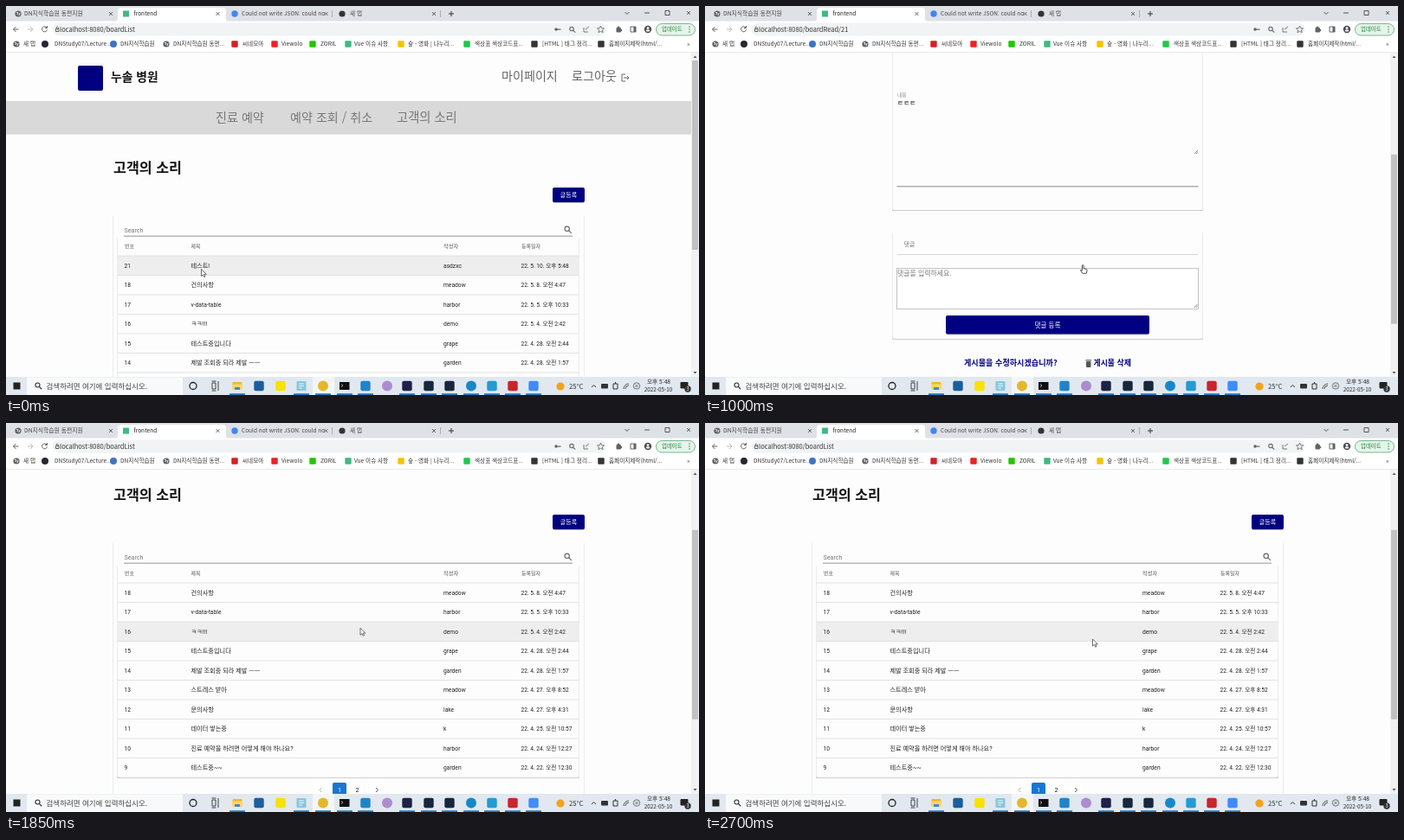
These frames come from a looping animation (800 by 450 pixels, 2.73 s). An HTML page:

```html
<!DOCTYPE html>
<html lang="ko">
<head>
<meta charset="utf-8">
<style>
html, body { margin: 0; width: 100%; height: 100%; overflow: hidden; background: #fff; }
svg { display: block; width: 800px; height: 450px; }
text { font-family: "Noto Sans CJK KR", "Noto Sans CJK", sans-serif; white-space: pre; }
.r { font-family: Roboto, "Noto Sans CJK KR", "Noto Sans CJK", sans-serif; }
.b { font-weight: 700; }
.m { text-anchor: middle; }
</style>
</head>
<body>
<svg id="stage" viewBox="0 0 800 450" xmlns="http://www.w3.org/2000/svg"></svg>
<script>
const NAVY = '#000080', INK = '#222', ICON = '#5f6368';

// y is the visual middle of the line
const text = (x, y, s, size, fill = INK, cls = '') =>
  `<text x="${x}" y="${y + size * 0.36}" font-size="${size}" fill="${fill}" class="${cls}">${s}</text>`;
const box = (x, y, w, h, fill, r = 0, extra = '') =>
  `<rect x="${x}" y="${y}" width="${w}" height="${h}" rx="${r}" fill="${fill}" ${extra}/>`;
const dot = (x, y, r, fill) => `<circle cx="${x}" cy="${y}" r="${r}" fill="${fill}"/>`;
const ring = (x, y, r, stroke, w) => `<circle cx="${x}" cy="${y}" r="${r}" fill="none" stroke="${stroke}" stroke-width="${w}"/>`;
const path = (d, stroke = ICON, w = 1, fill = 'none') =>
  `<path d="${d}" stroke="${stroke}" stroke-width="${w}" fill="${fill}"/>`;
const group = (id, body, extra = '') => `<g id="${id}" ${extra}>${body}</g>`;
const card = (x, y, w, h) =>
  box(x, y + 2, w, h - 1, '#e4e4e4', 2) + box(x, y + h - 1, w, 2, '#cfcfcf', 1) + box(x + 0.7, y, w - 1.4, h, '#fdfdfd', 2);
const lens = (x, y, r, color) => ring(x, y, r, color, 1.1) + path(`M${x + r * .7} ${y + r * .7}l${r * 1.2} ${r * 1.2}`, color, 1.1);
const globe = (x, y) => dot(x, y, 3.6, ICON) + path(`M${x - 2} ${y - 2}l2 1 -1 2M${x + 2} ${y - 1}l-1 3`, '#fff', .9);

const posts = [
  ['21', '테스트!', 'asdzxc', '22. 5. 10. 오후 5:48'],
  ['18', '건의사항', 'meadow', '22. 5. 8. 오전 4:47'],
  ['17', 'v-data-table', 'harbor', '22. 5. 5. 오후 10:33'],
  ['16', 'ㅋㅋ!!!', 'demo', '22. 5. 4. 오전 2:42'],
  ['15', '테스트중입니다', 'grape', '22. 4. 28. 오전 2:44'],
  ['14', '제발 조회중 되라 제발 ㅡㅡ', 'garden', '22. 4. 28. 오전 1:57'],
  ['13', '스트레스 받아', 'meadow', '22. 4. 27. 오후 8:52'],
  ['12', '문의사항', 'lake', '22. 4. 27. 오후 4:31'],
  ['11', '데이터 쌓는중', 'k', '22. 4. 25. 오전 10:57'],
  ['10', '진료 예약을 하려면 어떻게 해야 하나요?', 'harbor', '22. 4. 24. 오전 12:27'],
  ['9', '테스트중~~', 'garden', '22. 4. 22. 오전 12:30']
];
const ROW_TOP = 289, ROW = 22.5;

const siteHeader = () =>
  box(83, 69, 29, 29, NAVY, 2) + text(121, 82, '누솔 병원', 13.8, '#111', 'b') +
  text(572, 81, '마이페이지', 14.1, '#666') + text(653, 81, '로그아웃', 14.1, '#666') +
  path('M715 79h-4v8h4M713 83h6m-2-2l2 2-2 2', '#666') +
  box(0, 110, 791, 38.5, '#d9d9d9') +
  text(242, 129, '진료 예약', 14.1, '#777') + text(328, 129, '예약 조회 / 취소', 14.1, '#777') +
  text(451, 129, '고객의 소리', 14.3, '#777');

function listPage(rows, id) {
  let s = siteHeader() + text(124, 187, '고객의 소리', 16.2, '#111', 'b') +
    box(631, 211, 37, 17, '#bbb', 2) + box(631, 210, 37, 17, NAVY, 2) + text(649.5, 218.5, '글등록', 7, '#fff', 'm') +
    card(123, 240, 545, 303) + card(128, 266, 534, 248) +
    text(136.5, 259, 'Search', 7.2, '#777', 'r') + box(136, 265.7, 518, .9, '#888') + lens(647.7, 257.8, 2.7, '#666') +
    text(137, 278, '번호', 5.9, '#555') + text(213.5, 278, '제목', 5.9, '#555') +
    text(505, 278, '작성자', 6.2, '#555') + text(595, 278, '등록일자', 6, '#555') +
    box(128.5, 0, 533, ROW, '#eee', 0, 'class="hover"');
  rows.forEach(([no, title, author, date], i) => {
    const y = ROW_TOP + ROW * i, mid = y + 11.4;
    s += box(128.5, y - .4, 533, .8, '#dcdcdc') +
      text(136.5, mid, no, 6.7, INK, 'r') + text(213.5, mid, title, title[0] == 'v' ? 6.7 : 7.2, INK, 'r') +
      text(505, mid, author, 6.7, INK, 'r') + text(594.5, mid, date, 6.6, INK, 'r');
  });
  const button = x => box(x, 521, 16, 16, '#ddd', 2) + box(x, 520, 16, 16, '#fff', 2);
  s += button(355) + button(397.5) + button(420) + box(377, 520, 16, 16.5, '#1976d2', 2) +
    path('M364.5 526l-2.5 2.5 2.5 2.5', '#aaa') + path('M427 526l2.5 2.5 -2.5 2.5', '#555') +
    text(385, 528.3, '1', 7.2, '#fff', 'r m') + text(405.5, 528.3, '2', 7.2, INK, 'r m') +
    box(0, 583, 791, 90, '#f5f5f5') +
    text(8, 602, '<tspan fill="#4a7fa8">고객의 소리</tspan>  |  <tspan fill="#4a7fa8">홈페이지</tspan>  |  CodNab  |  Blogumi', 7.6, INK, 'r') +
    text(7.5, 621.5, 'Personal Project  |  Java  |  Server Framework  |  Jpa  |  Server boot  |  MYSQL  |  Javascript  |  Vue', 7.2, INK, 'r') +
    text(8, 639, '이 홈페이지는 학습을 위하여 제작된 개인 프로젝트이며 실제 진료 예약이나 상담은 제공하지 않습니다', 8.4, '#567');
  return group(id, s);
}

const grip = (x, y) => path(`M${x} ${y}l4-4M${x + 2.2} ${y}l1.8-1.8`, '#666', .8);
const readPage = () => group('read',
  siteHeader() + text(395.5, 187, '글 읽기', 15.1, '#111', 'b m') +
  card(216, 200, 359, 244) +
  text(222, 208, '제목', 5.6, '#888') + text(222, 217.5, '테스트!', 7.8) + box(221.5, 225.5, 348, .9, '#999') +
  text(222, 241, '작성자', 5.8, '#888') + text(222, 251, 'asdzxc', 7.4, INK, 'r') + box(221.5, 258.5, 348, .9, '#999') +
  text(222, 311, '내용', 5.8, '#888') + text(222, 320, 'ㅌㅌㅌ', 7.8) + grip(565, 379) + box(221.5, 416.3, 348, 1, '#888') +
  card(216, 468, 359, 125) +
  text(229.5, 483, '댓글', 7, '#777') + box(221.5, 495, 348, .8, '#ccc') +
  box(221.5, 511.5, 348, 47, '#fff', 0, 'stroke="#b5b5b5" stroke-width=".8"') +
  text(222, 517, '댓글을 입력하세요.', 7.9, '#777') + grip(564.5, 557) +
  box(278, 567, 235, 21.5, '#bbb', 2) + box(278, 566, 235, 21.5, NAVY, 2) + text(395.5, 577, '댓글 등록', 7.6, '#fff', 'm') +
  text(299, 621, '게시물을 수정하시겠습니까?', 9.1, NAVY, 'b') +
  box(440, 619, 5.5, 7, '#555', 1) + box(439.3, 617.3, 7, 1.1, '#555') +
  text(448.5, 621, '게시물 삭제', 8.9, NAVY, 'b'));

function browser() {
  const close = (x, y = 9) => path(`M${x - 2} ${y - 2}l4 4m0-4l-4 4`, '#444', .8);
  let s = box(0, 0, 800, 18, '#dee1e6') + box(0, 17.5, 800, 36, '#fff') + box(0, 53, 800, .8, '#e3e5e8') +
    '<path d="M126 18q3 0 3-4V6q0-4 4-4H250q4 0 4 4v8q0 4 3 4z" fill="#fff"/>' +
    globe(14, 9) + text(21, 9, 'DN지식학습원 동편지원', 6.8, '#444') + close(121) +
    box(135, 5.5, 7, 7, '#41b883') + text(147.5, 9, 'frontend', 6.6) + close(244.5) +
    dot(264, 9, 3.7, '#4285f4') + text(272, 9, 'Could not write JSON: could no', 6.5, '#444') + close(369.5) +
    dot(388, 9, 3.6, '#333') + text(397, 9, '새 탭', 6.6, '#444') + close(494) +
    box(376, 5, .7, 8, '#999') + box(501, 5, .7, 8, '#999') +
    path('M511 9h6M514 6v6', '#333') + path('M714.5 7l2.5 2.5 2.5-2.5M737 8h6', '#333', .8) +
    path('M761 5.5h5v5h-5z', '#333', .8) + close(788, 8) +
    path('M14.5 27H8.5m3-3l-3 3 3 3', ICON) + path('M25 27h6m-3-3l3 3-3 3', '#bbb') +
    path('M47 25a3 3 0 1 0 .5 2.5M47.5 23v2.6h-2.6') +
    box(53.5, 19.5, 639, 15, '#f1f3f4', 7.5) +
    path('M57.5 26.5h3.5v3h-3.5zM58 26.5v-1.5q1.2-2 2.4 0v1.5') + '<g id="url"></g>' +
    dot(635, 27, 1.7, ICON) + box(636, 26.5, 4.5, 1.2, ICON) + lens(653, 26.5, 2.2, ICON) +
    path('M667 25v5h5M669 27l4-3', '#777') +
    path('M686.5 23l1.2 2.7 2.9.2-2.2 1.9.7 2.9-2.6-1.5-2.6 1.5.7-2.9-2.2-1.9 2.9-.2z', ICON, .8) +
    box(704.5, 25, 5.5, 5.5, ICON, 1) + dot(707, 24.8, 1.4, ICON) + dot(710, 28, 1.3, ICON) +
    path('M721 24h6v6h-6z') + box(724.5, 24, 2.5, 6, ICON) +
    dot(741, 27, 4.2, '#4a4a52') + dot(741, 25.6, 1.4, '#fff') + box(738.8, 27.6, 4.4, 1.8, '#fff', 1) +
    box(750.5, 20.5, 45, 13.5, '#e6f4ea', 6.7, 'stroke="#5aa577" stroke-width=".8"') + text(757, 27, '업데이트', 6.4, '#188038') +
    [24, 27, 30].map(y => dot(789, y, .7, '#188038')).join('');

  // [icon x, icon colour, round, label x, label]
  const marks = [
    [12, 0, 1, 20, '새 탭'], [45, '#24292f', 1, 56, 'DNStudy07/Lecture...'], [124, '#3d73c9', 1, 132, 'DN지식학습원'],
    [185, 0, 1, 193, 'DN지식학습원 동편...'], [264, '#d81f26', 0, 273, '씨네모아'], [310, '#e22', 0, 318, 'Viewolo'],
    [354, '#1ec800', 0, 363, 'ZORIL'], [395, '#41b883', 0, 402, 'Vue 이슈 사항'], [456, '#f5c400', 0, 464, '숲 - 영화 | 나누리...'],
    [532, '#1ec84b', 0, 541, '색상표 색상코드표...'], [610, '#333', 0, 619, '[HTML ] 태그 정리...'], [687, '#333', 0, 696, '홈페이지제작(html/...']
  ];
  for (const [x, color, round, lx, label] of marks)
    s += (!color ? globe(x, 44) : round ? dot(x, 44, 4, color) : box(x - 3.7, 40.3, 7.4, 7.4, color, 1)) + text(lx, 44, label, 6.6, '#333');
  return s + text(786, 43.5, '»', 7, '#444');
}

function taskbar() {
  let s = box(0, 429, 800, 21, '#e1e8ef') + box(8.5, 435.5, 8, 8, '#222') +
    box(24, 429.5, 180, 20.5, '#f8f9fa') + lens(36.5, 438.5, 2.5, '#333') + text(46.5, 439.5, '검색하려면 여기에 입력하십시오.', 8.5, '#444') +
    ring(216, 439.5, 4, '#222', 1.3) +
    path('M238 436h4v7h-4zM237.5 434h5M237.5 445h5M245 434v11', '#333', .9) +
    box(354, 429, 25, 21, '#f3f6f9') +
    box(261.5, 435, 11, 9, '#f5b52e', 1) + box(261.5, 437.5, 11, 6.5, '#ffd767', 1) + box(264, 441, 6, 3, '#3b8bd0') +
    box(335.5, 434, 11, 11, '#86c7dc', 1) + path('M338 437h6m-6 2.5h6m-6 2.5h4', '#fff', .8) +
    box(385, 435, 11.5, 9, '#111') + path('M387 437.5l2 1.5-2 1.5', '#ddd', .7);
  const apps = [
    [292, '#1b5e9c'], [317, '#fae100'], [366, '#e5b72c', 1], [415, '#1f84c9'], [440, '#ad8bd0', 1], [463, '#20204a'],
    [488, '#17283d'], [512, '#17283d'], [537, '#1688c9', 1], [561, '#239bd5'], [585, '#c9252d'], [609, '#3f8cff']
  ];
  for (const [x, color, round] of apps)
    s += round ? dot(x, 439.5, 6, color) : box(x - 5.7, 433.8, 11.4, 11.4, color, 2);
  for (const x of [267, 341, 366, 391, 415, 463, 488, 512, 537, 561, 585, 609])
    s += box(x - 9, 448.2, 18, 1.8, '#2279c4');
  return s + dot(640, 440, 4.6, '#f6a21b') + text(650, 440, '25°C', 7.8, '#333') +
    path('M676 441l2.5-2.5 2.5 2.5', '#333') + box(687, 437, 8, 5.5, '#333', 1) +
    path('M701 437h5v6h-5zM703.5 435v2', '#333') + path('M713 443a6 6 0 0 1 6-6M715 443a4 4 0 0 1 4-4', '#555') +
    ring(728, 439.5, 3.7, '#555', .8) + path('M726.5 438l3 3m0-3l-3 3', '#555', .8) +
    text(753.5, 435, '오후 5:48', 6.7, INK, 'm') + text(753, 443.5, '2022-05-10', 6.3, INK, 'm') +
    box(778.5, 435, 9, 7.5, '#222', 1) + dot(787, 443, 3.7, '#333') + text(787, 443, '3', 5.5, '#fff', 'm');
}

const dialog = group('dialog',
  box(281.5, 35, 237, 70, '#000', 4, 'opacity=".12"') + box(282.5, 35, 235, 68.5, '#000', 3, 'opacity=".2"') + box(283.3, 35.5, 233.4, 67, '#fff', 3) +
  text(292, 49, 'localhost:8080 내용:', 7.5) + text(292, 64.5, '게시물 삭제 성공!!', 7.3, '#444') +
  box(474.5, 77.5, 34, 17, '#fff', 3, 'stroke="#6aa0ea" stroke-width="1.3"') + box(476, 79, 31, 14, '#2477dc', 2) +
  text(491.5, 86, '확인', 6.6, '#fff', 'm'));

const pointer = group('arrow', path('M0 0v8l1.9-1.7 1.3 2.8 1.3-.6-1.3-2.7h2.6z', '#333', .7, '#fff')) +
  group('hand', path('M-.6 0q1-.8 1.6 0v3.5l3.5 1q.8.5.5 1.8l-.7 3h-4.3l-2.7-3.4q.2-1.3 2.1 0z', '#222', .8, '#fff'));

const stage = document.getElementById('stage');
stage.innerHTML = '<clipPath id="view"><rect y="54" width="791" height="375"/></clipPath>' +
  box(0, 0, 800, 450, '#fdfdfd') +
  group('clip', group('pages', listPage(posts.slice(0, 10), 'before') + readPage() + listPage(posts.slice(1), 'after')), 'clip-path="url(#view)"') +
  box(791, 54, 9, 375, '#f1f1f1') + box(792, 63, 7, 10, '#c1c1c1', 0, 'id="thumb"') +
  '<path d="M793.5 60l2-2.5 2 2.5zM793.5 423l2 2.5 2-2.5z" fill="#555"/>' +
  group('status', box(-2, 418, 91, 12, '#dee1e6', 2) + text(2, 423.5, 'localhost:8080/boardRead/21', 6.7, '#444')) +
  browser() + taskbar() + dialog + group('cursor', pointer);

const el = id => document.getElementById(id);
const show = (id, on) => el(id).setAttribute('display', on ? 'inline' : 'none');

// keys: [time, ...values], eased between neighbours
function at(keys, t) {
  const i = keys.findIndex(k => k[0] > t);
  if (i < 0) return keys[keys.length - 1].slice(1);
  const a = keys[i - 1], b = keys[i], p = (t - a[0]) / (b[0] - a[0]), e = p * p * (3 - 2 * p);
  return a.slice(1).map((v, n) => v + (b[n + 1] - v) * e);
}
const cursorKeys = [
  [0, 225.5, 304.5], [150, 224, 301], [270, 224, 301], [520, 354, 272], [700, 354, 272], [1000, 436, 300],
  [1170, 468, 411], [1260, 468, 411], [1490, 490, 85], [1600, 490, 85], [1800, 410, 240], [1980, 405, 226],
  [2060, 403, 208.5], [2150, 403, 208.5], [2300, 540, 165], [2390, 534.5, 204], [2600, 460, 242], [2700, 447.5, 250]
];
const scrollKeys = [
  [0, 0], [620, 0], [720, 104], [780, 104], [880, 208], [1619, 208], [1620, 0],
  [1740, 0], [1840, 104], [1880, 104], [1980, 208], [2160, 208], [2270, 104]
];
const LOOP = 2730, OPENED = 280, DELETED = 1620;

function draw(now) {
  const t = now % LOOP;
  const reading = t >= OPENED && t < DELETED;
  const [x, y] = at(cursorKeys, t), [scroll] = at(scrollKeys, t);
  show('before', t < OPENED);
  show('read', reading);
  show('after', t >= DELETED);
  el('pages').setAttribute('transform', `translate(0 ${-scroll})`);

  const total = reading ? 685 : 613, thumb = el('thumb');
  thumb.setAttribute('y', 63 + scroll / total * 358);
  thumb.setAttribute('height', 375 / total * 358);

  // row highlight trails the pointer slightly
  const [, hy] = at(cursorKeys, Math.max(0, t - 50));
  const row = Math.floor((hy + scroll - ROW_TOP) / ROW);
  for (const h of document.querySelectorAll('.hover')) {
    h.setAttribute('y', ROW_TOP + row * ROW);
    h.setAttribute('opacity', row >= 0 && row < 10 ? 1 : 0);
  }

  const url = 'localhost:8080/' + (reading ? 'boardRead/21' : 'boardList');
  if (el('url').textContent !== url) el('url').innerHTML = text(62, 27, url, 7.5, '#333');
  show('status', t > 120 && t < 560);
  show('dialog', t > 1290 && t < 1600);
  const hand = (t > 120 && t < 300) || (t > 950 && t < 1600);
  show('hand', hand);
  show('arrow', !hand);
  el('cursor').setAttribute('transform', `translate(${x} ${y})`);
}

const start = performance.now();
function tick() {
  draw(performance.now() - start);
  requestAnimationFrame(tick);
}
tick();
</script>
</body>
</html>
```
